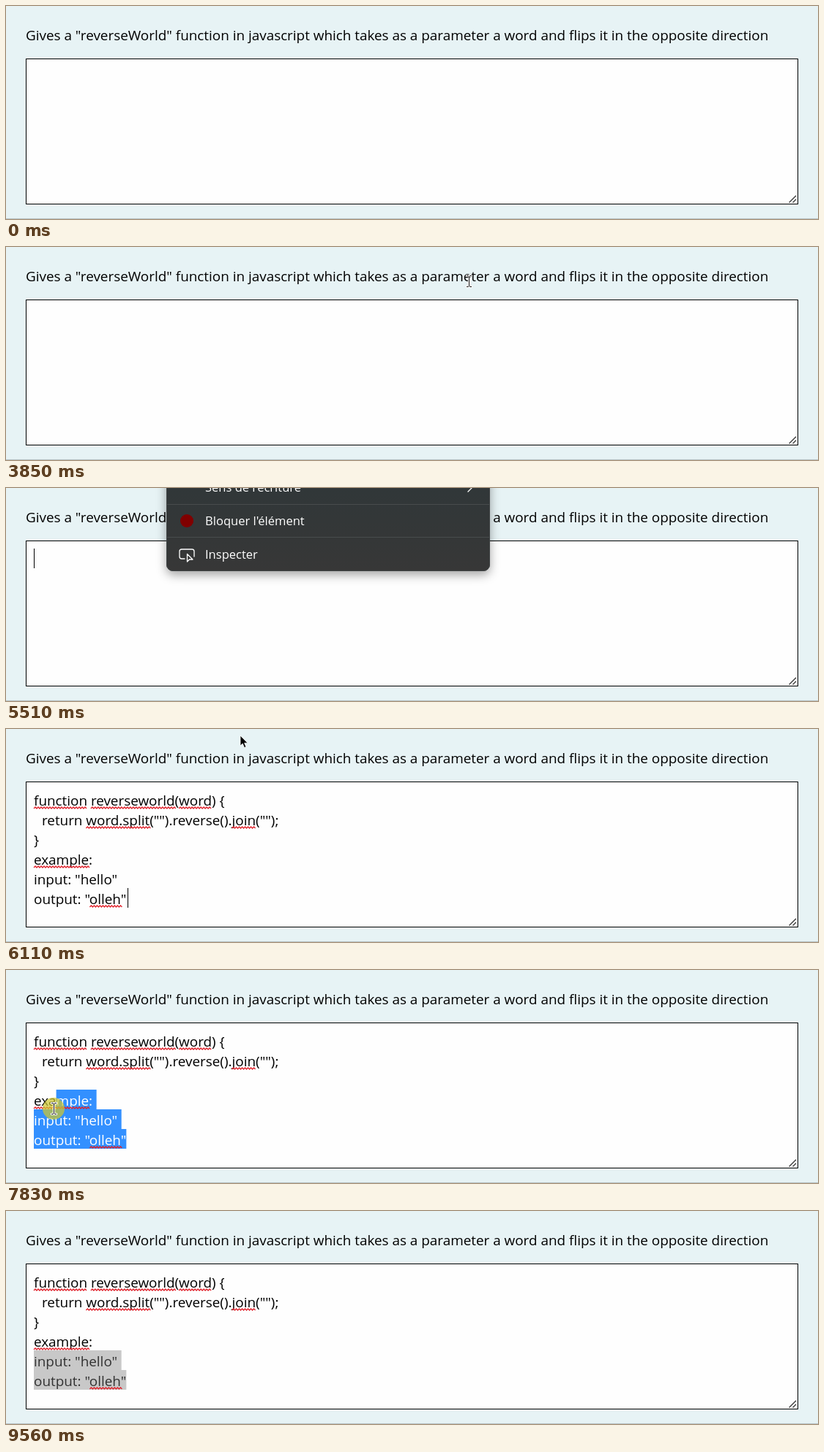
Write an HTML page that moves like this. It is 1109 px wide and 292 px high and loops after 9.62 s.

```html
<!DOCTYPE html>
<html lang="en">
<head>
<meta charset="utf-8">
<title>Text area demo</title>
<style>
html, body { margin: 0; width: 100%; height: 100%; overflow: hidden; background: #e7f3f5; }
svg { display: block; width: 1109px; height: 292px; }
text { font: 18.89px "Open Sans", "Noto Sans", sans-serif; }
#menu text { font-size: 16.55px; fill: #fff; }
#panel { filter: drop-shadow(0 5px 7px rgba(0, 0, 0, .36)); }
.line { fill: none; stroke: #fff; stroke-width: 1.3; stroke-linejoin: round; stroke-linecap: round; }
#waves { fill: none; stroke: #e0202a; stroke-width: 1.4; }
</style>
</head>
<body>
<svg id="stage" viewBox="0 0 1109 292">
  <defs>
    <clipPath id="picked"></clipPath>
    <linearGradient id="dark" x2="0" y2="1">
      <stop stop-color="#2f3739"/><stop offset="1" stop-color="#373737"/>
    </linearGradient>
  </defs>
  <rect width="1109" height="292" fill="#e7f3f5"/>
  <path d="M0 291.5H1109" stroke="#b9c5c8"/>
  <text x="27" y="47">Gives a "reverseWorld" function in javascript which takes as a parameter a word and flips it in the opposite direction</text>
  <rect x="27.5" y="72.5" width="1054" height="199" fill="#fefefe" stroke="#000"/>
  <path d="M1069.500 269.500l9.500-9.500M1074.500 269.500l4.500-4.500" stroke="#333" stroke-width="1.3"/>

  <g id="code"></g>
  <g id="marks"></g>
  <g id="over" clip-path="url(#picked)"></g>
  <g id="waves"></g>
  <rect id="caret" width="1" height="27"/>

  <g id="menu">
    <rect id="panel" x="219" y="-30" width="442" height="144" rx="9" fill="url(#dark)"/>
    <rect x="219.5" y="-30" width="441" height="143.5" rx="8.5" fill="none" stroke="#404445"/>
    <path d="M220 22.5H660M220 67.5H660" stroke="#484c4d"/>
    <text x="272" y="4.5">Sens de l'écriture</text>
    <path class="line" d="M631 -7l6 6-6 6"/>
    <circle cx="247" cy="45" r="9" fill="#800000"/>
    <text x="272" y="50.5">Bloquer l'élément</text>
    <path class="line" d="M244 97h-4q-3 0-3-3v-7q0-3 3-3h14q3 0 3 3v7"/>
    <path class="line" d="M247.5 90.500v10.500l3-3h4.500z"/>
    <text x="272" y="96.5">Inspecter</text>
  </g>

  <g id="pointer">
    <circle id="halo" r="15" fill="#cdc62f" opacity=".72"/>
    <g id="beam" fill="none" stroke-linecap="square" transform="translate(.5 0)">
      <path d="M-3 -7.500h2l1 1 1-1h2M0 -6.500v13M-3 7.500h2l1-1 1 1h2" stroke="#fff" stroke-width="3"/>
      <path d="M-3 -7.500h2l1 1 1-1h2M0 -6.500v13M-3 7.500h2l1-1 1 1h2" stroke="#111"/>
    </g>
    <path id="arrow" d="M0 0V14l3.200-3 2.300 5.500 2.400-1-2.300-5.300H10z" fill="#000" stroke="#fff" stroke-width=".8"/>
    <g id="wait">
      <path d="M-5.500-9.500h11v3h-1v3l-3 4 3 4v3h1v3h-11v-3h1v-3l3-4-3-4v-3h-1z" fill="#fff" stroke="#fff"/>
      <path d="M-5-8.500H5M-5-6.500H5M-5 7.500H5M-5 9.500H5" stroke="#000" stroke-width="1.2"/>
      <path d="M-4-6v2l3.500 4.500-3.500 4.500v2M4-6v2L.5.5 4 5v2" fill="none" stroke="#000" stroke-width="1.2"/>
      <path d="M-3-3h6L.5.5V3L3 6h-6l2.500-3V.5z"/>
    </g>
  </g>
</svg>
<script>
const LOOP = 9620, TICK = 66.35, LEFT = 38, TOP = 83, ROW = 27, NEWLINE = 5.5;
const $ = id => document.getElementById(id);
const lines = [
  'function reverseworld(word) {',
  'return word.split("").reverse().join("");',
  '}',
  'example:',
  'input: "hello"',
  'output: "olleh"'
];
const typos = [
  [0, 'function'], [0, 'reverseworld'], [0, 'word'],
  [1, 'word.split'], [1, 'join'], [3, 'example'], [5, 'olleh']
];
// Pointer path: tick, x, y, ease
const path = [
  [8, 988, 261], [22, 664, 56, 'out'], [25, 649, 40, 'out'], [57, 649, 40],
  [64, 335, 168, 'inOut'], [66, 299, 150], [68, 299, 150], [72, 220, 115, 'out'],
  [75, 232, 82], [80, 300, -20], [91, 322, -8],
  [92, 320, 9], [106, 197, 216, 'inOut'], [109, 192, 219], [111, 190, 227],
  [118, 65, 190, 'inOut'], [121, 34, 187, 'out'], [126, 24, 200, 'out'],
  [131, 24, 200], [138, 1090, 280, 'inOut'], [139, 1120, 300]
];
const ease = {
  out: p => p * (2 - p),
  inOut: p => p * p * (3 - 2 * p)
};
const within = (n, ...spans) => spans.some(([a, b]) => n >= a && n < b);
const show = (el, on) => { el.style.display = on ? '' : 'none'; };

function make(tag, attrs, parent) {
  const el = document.createElementNS('http://www.w3.org/2000/svg', tag);
  for (const key in attrs) el.setAttribute(key, attrs[key]);
  return parent.appendChild(el);
}

function writeLines(parent) {
  return lines.map((line, i) => {
    const el = make('text', { x: i === 1 ? 49 : LEFT, y: TOP + 22 + i * ROW }, parent);
    el.textContent = line;
    return el;
  });
}

const texts = writeLines($('code'));
writeLines($('over'));
const edge = (row, i) => i < lines[row].length
  ? texts[row].getStartPositionOfChar(i).x
  : texts[row].getEndPositionOfChar(i - 1).x;

for (const [row, word] of typos) {
  const from = lines[row].indexOf(word);
  const x = edge(row, from), width = edge(row, from + word.length) - x;
  const d = `M${x} ${TOP + row * ROW + 26}` + 'l2-2l2 2'.repeat(Math.round(width / 4));
  make('path', { d }, $('waves'));
}

const bars = [3, 4, 5].map(row => ['marks', 'picked'].map(id =>
  make('rect', { y: TOP + row * ROW, height: ROW }, $(id))));

function pointerAt(n) {
  const i = path.findIndex(k => k[0] >= n);
  if (i < 1) return path[i < 0 ? path.length - 1 : 0].slice(1, 3);
  const [n0, x0, y0] = path[i - 1], [n1, x1, y1, kind] = path[i];
  let p = (n - n0) / (n1 - n0);
  if (kind) p = ease[kind](p);
  return [x0 + (x1 - x0) * p, y0 + (y1 - y0) * p];
}

// Select from the character nearest to the pointer to the end of the text
function select(n) {
  const on = n > 111;
  const [x, y] = pointerAt(Math.min(n, 126));
  const first = Math.min(5, Math.floor((y - TOP) / ROW));
  bars.forEach((pair, k) => {
    const row = k + 3, size = lines[row].length;
    const end = edge(row, size);
    let start = LEFT;
    if (row === first) {
      for (let i = 0; i <= size; i++) {
        const at = edge(row, i);
        if (Math.abs(at - x) < Math.abs(start - x)) start = at;
      }
    }
    const width = on && row >= first ? end - start + (row < 5 ? NEWLINE : 0) : 0;
    for (const bar of pair) {
      bar.setAttribute('x', start);
      bar.setAttribute('width', width);
    }
  });
  const blurred = n >= 144;
  $('marks').setAttribute('fill', blurred ? '#c8c8c8' : '#3390ff');
  $('over').setAttribute('fill', blurred ? '#323232' : '#fff');
}

function drawPointer(n) {
  const [x, y] = pointerAt(n);
  const pressed = within(n, [26, 29], [66, 69], [111, 132]);
  const wait = within(n, [29, 52]);
  const onTitle = y > 27 && y < 54 && x < 1043;
  const inBox = x > 27 && x < 1082 && y > 72 && y < 272;
  const beam = !wait && !within(n, [72, 92]) && (pressed || onTitle || inBox);
  show($('pointer'), within(n, [8, 80], [92, 139]));
  show($('halo'), pressed);
  show($('wait'), wait);
  show($('beam'), beam);
  show($('arrow'), !wait && !beam);
  $('pointer').setAttribute('transform', `translate(${Math.round(x)} ${Math.round(y)})`);
}

function draw(t) {
  const n = Math.floor(t / TICK + 0.2);
  const filled = n >= 89;
  show($('code'), filled);
  show($('waves'), n >= 92);
  show($('caret'), within(n, [66, 76], [83, 97], [104, 112]));
  $('caret').setAttribute('x', filled ? 166 : LEFT);
  $('caret').setAttribute('y', filled ? 218 : TOP);
  show($('menu'), within(n, [73, 89]));
  $('menu').setAttribute('opacity', Math.min(1, (n - 72) / 3));
  select(n);
  drawPointer(n);
}

const begin = performance.now();
function loop() {
  draw((performance.now() - begin) % LOOP);
  requestAnimationFrame(loop);
}
loop();
</script>
</body>
</html>
```
